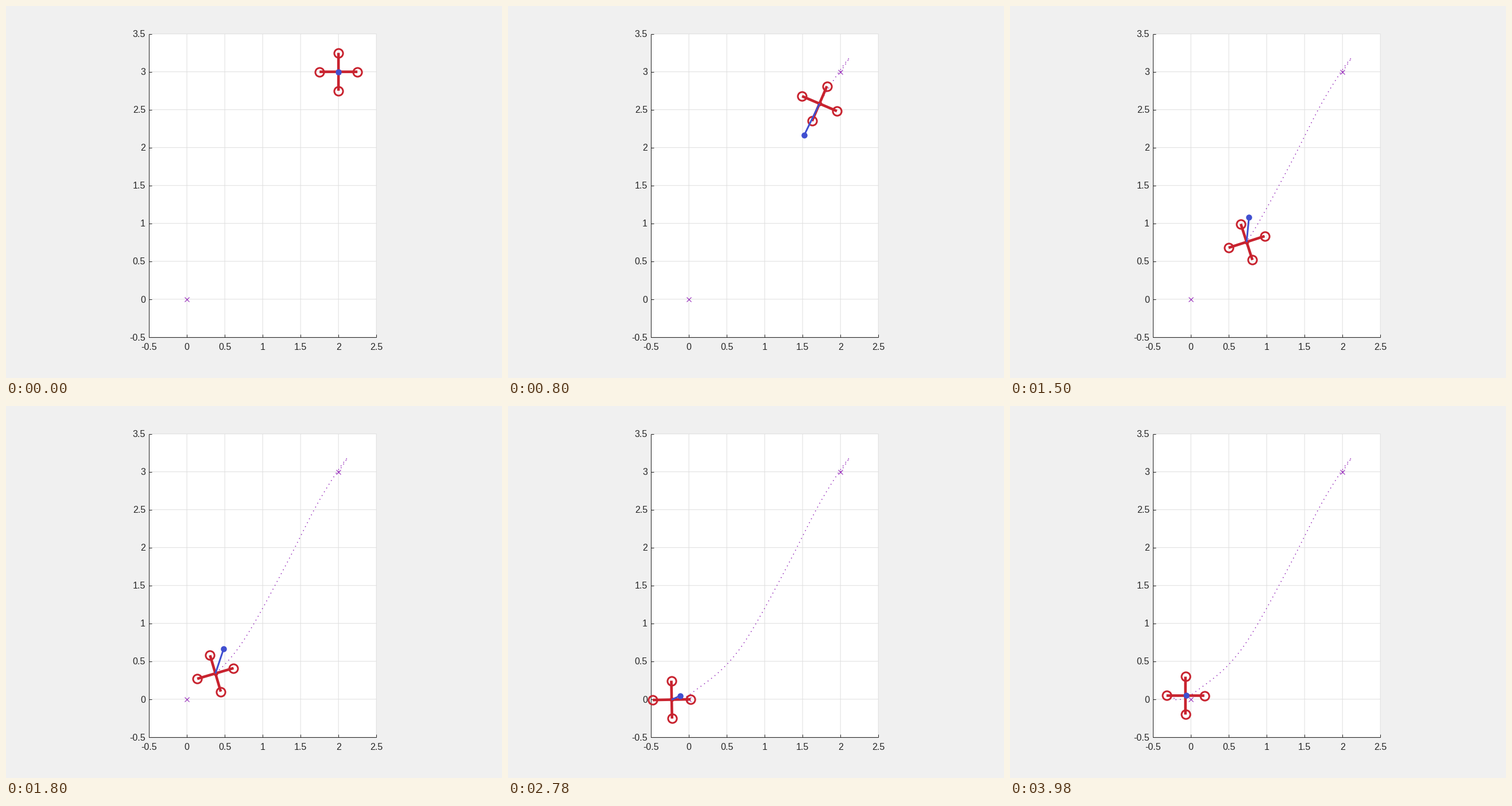
Write a matplotlib script that moves like this. It is 864x648 px and loops after 4 s.

```python
import matplotlib.pyplot as plt
import numpy as np
from matplotlib.animation import FuncAnimation

W, H, DPI = 864, 648, 72          # at 72 dpi one point is one pixel
FRAMES, STEP = 200, 20
UNIT, ARM = 132.03, 33            # pixels per axis unit, pixels per drone arm
RED, BLUE, PURPLE, INK, GRID = "#c8232f", "#404fd0", "#9a34bd", "#262626", "#dfdfdf"

plt.rcParams["font.family"] = "Liberation Sans"


def px(x):
    return 249.08 + UNIT * (x + 0.5)


def py(y):
    return 576.72 - UNIT * (y + 0.5)


def glide(t, keys):
    """Smooth curve through (time, x, y) waypoints, starting at rest."""
    kt, kv = keys[:, 0], keys[:, 1:]
    slope = np.gradient(kv, kt, axis=0)
    slope[0] = 0
    i = np.clip(np.searchsorted(kt, t, side="right") - 1, 0, len(kt) - 2)
    h = (kt[i + 1] - kt[i])[:, None]
    s = (t - kt[i])[:, None] / h
    return ((2 * s**3 - 3 * s**2 + 1) * kv[i] + (s**3 - 2 * s**2 + s) * h * slope[i]
            + (3 * s**2 - 2 * s**3) * kv[i + 1] + (s**3 - s**2) * h * slope[i + 1]).T


def pulse(t, peak, sharp):
    """Rise from zero to one at the peak time, then die away."""
    u = t / peak
    return (u * np.exp(1 - u)) ** sharp


# The drone backs off, swings the load forward, then flies to the origin.
ROUTE = np.array([
    [0, 2, 3], [0.34, 2.117, 3.183], [0.54, 2.021, 3.059], [0.8, 1.723, 2.58],
    [1.08, 1.31, 1.778], [1.5, 0.735, 0.755], [2.14, 0.053, 0.092],
    [2.78, -0.227, -0.006], [3.26, -0.193, 0.032], [3.98, -0.072, 0.047],
])
t = np.arange(FRAMES) * STEP / 1000
route_x, route_y = glide(t, ROUTE)
cx, cy = px(route_x), py(route_y)
tilt = np.radians(38 * pulse(t, 0.4, 1) - 27 * pulse(t, 1.48, 11))
swing = pulse(t, 0.76, 7)
load_x = cx - 27 * swing + 21 * pulse(t, 2.25, 14)
load_y = cy + 67 * swing - 51.5 * pulse(t, 1.52, 9)

fig = plt.figure(figsize=(W / DPI, H / DPI), dpi=DPI, facecolor="#f0f0f0")
ax = fig.add_axes([0, 0, 1, 1])
ax.set(xlim=(0, W), ylim=(H, 0))
ax.axis("off")

left, right, top, bottom = px(-0.5), px(2.5), py(3.5), py(-0.5)
xticks, yticks = np.arange(-0.5, 2.6, 0.5), np.arange(-0.5, 3.6, 0.5)


def rule(xs, ys, color, snap=True):
    ax.plot(xs, ys, color=color, lw=1, solid_capstyle="butt", snap=snap)


ax.fill([left, right, right, left], [top, top, bottom, bottom], color="white", lw=0)
for x in xticks:
    rule([px(x)] * 2, [top, bottom], GRID, False)
for y in yticks:
    rule([left, right], [py(y)] * 2, GRID, False)
rule([left, left], [top, bottom], INK)
rule([left, right], [bottom, bottom], INK)
for x in xticks:
    rule([px(x)] * 2, [bottom, bottom - 5], INK)
    ax.text(px(x), 594.2, f"{x:g}", size=16, color=INK, ha="center", va="center")
for y in yticks:
    rule([left, left + 5], [py(y)] * 2, INK)
    ax.text(243, py(y) + 1.3, f"{y:g}", size=16, color=INK, ha="right", va="center")

ax.plot([px(0), px(2)], [py(0), py(3)], "x", color=PURPLE, ms=8, mew=1.2, snap=False)
trail, = ax.plot([], [], color=PURPLE, lw=1.6, dashes=(1, 3.8),
                 dash_capstyle="butt", snap=False)


def bar(color, width):
    return ax.plot([], [], color=color, lw=width, solid_capstyle="butt", snap=False)[0]


def dot(color, size):
    return ax.plot([], [], "o", color=color, ms=size, mew=0, snap=False)[0]


arms = [bar(RED, 4.6), bar(RED, 4.6)]
rotors, = ax.plot([], [], "o", mfc="none", mec=RED, ms=15.2, mew=3, snap=False)
hub = dot(RED, 8)
tether = bar(BLUE, 3)
load = dot(BLUE, 10.5)


def draw(i):
    a = tilt[i] + np.arange(4) * np.pi / 2
    tx, ty = cx[i] + ARM * np.cos(a), cy[i] + ARM * np.sin(a)
    for k, arm in enumerate(arms):
        arm.set_data(tx[k::2], ty[k::2])
    rotors.set_data(tx, ty)
    hub.set_data([cx[i]], [cy[i]])
    tether.set_data([cx[i], load_x[i]], [cy[i], load_y[i]])
    load.set_data([load_x[i]], [load_y[i]])
    trail.set_data(cx[:i + 1], cy[:i + 1])
    return [trail, *arms, rotors, hub, tether, load]


anim = FuncAnimation(fig, draw, frames=FRAMES, interval=STEP, repeat=True,
                     repeat_delay=0, init_func=lambda: draw(0))
plt.show()
```
